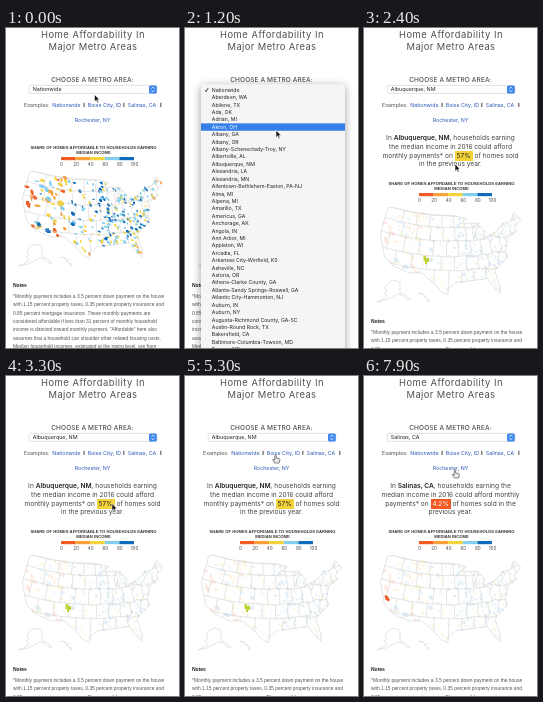
Write an HTML page that moves like this. It is 173 px wide and 320 px high and loops after 8000 ms.

```html
<!DOCTYPE html>
<html lang="en">
<head>
<meta charset="utf-8">
<title>Home affordability</title>
<style>
html, body { margin: 0; width: 100%; height: 100%; overflow: hidden; background: #fff; }
svg { position: absolute; left: 0; top: 0; width: 173px; height: 320px; overflow: hidden; font-family: Inter, "Open Sans", sans-serif; }
#para { position: absolute; left: 0; top: 106px; width: 173px; text-align: center; white-space: nowrap;
  font: 6.6px/8.75px Inter, "Open Sans", sans-serif; color: #444; }
#para b { color: #222; font-weight: 600; }
#para span { padding: 1px 1.9px; color: #222; }
.arial { font-family: "Liberation Sans", Arial, sans-serif; }
#popup { filter: drop-shadow(0 2px 4px rgba(0,0,0,.4)); }
</style>
</head>
<body>
<svg viewBox="0 0 173 320" id="page"></svg>
<div id="para"></div>
<svg viewBox="0 0 173 320" id="over"></svg>
<script>
const $ = id => document.getElementById(id);
const COLORS = ['#f15a22', '#f9a03a', '#f3d339', '#80cfee', '#0f6cba'];
let seed = 11;
const rand = () => (seed = seed * 16807 % 2147483647) / 2147483647;

const text = (x, y, size, str, extra = '') =>
  `<text x="${x}" y="${y}" font-size="${size}" ${extra}>${str}</text>`;
const rect = (x, y, w, h, fill, extra = '') =>
  `<rect x="${x}" y="${y}" width="${w}" height="${h}" fill="${fill}" ${extra}/>`;
const mid = 'text-anchor="middle"';

// ---- Map: Albers equal-area projection of longitude and latitude ----
const rad = Math.PI / 180, s1 = Math.sin(29.5 * rad), n = (s1 + Math.sin(45.5 * rad)) / 2;
const C = 1 - s1 * s1 + 2 * n * s1;
const rho = lat => Math.sqrt(C - 2 * n * Math.sin(lat * rad)) / n;
function project([lon, lat]) {
  const a = n * (lon + 96) * rad, r = rho(lat);
  return [88 + 195 * r * Math.sin(a), 191 - 195 * (rho(37.5) - r * Math.cos(a))];
}
const line = pts => 'M' + pts.map(p => project(p).map(v => v.toFixed(1))).join('L');

const shore = `-122.8 49,-114 49,-105 49,-95 49,-89.6 48,-92 46.7,-84.7 46.3,-87.7 44.5,-87.4 41.7,-86.3 44,
  -84.7 45.8,-82.6 43.9,-83.2 42,-79 42.8,-76.3 44,-74.9 45,-71.5 45,-69 47.3,-67 44.8,-70.7 43,-70 41.8,-74 40.6,
  -76 37,-75.6 35.3,-81 32,-80.1 26.8,-80.6 25.2,-82.8 27.8,-83.9 30,-89.2 29.8,-94.5 29.5,-97.3 27.5,-97.3 25.9,
  -99.2 26.5,-102.7 29.5,-106.5 31.8,-111 31.3,-117.1 32.5,-120.6 34.6,-124.3 40.4,-124.6 48.4`;
const coast = line(shore.split(',').map(p => p.trim().split(' ').map(Number))) + 'Z';

// State borders: straight and wide apart in the west, closer and more crooked towards the east
const crook = lon => Math.max(0, lon + 102) / 20 * (rand() - .5);
const bands = [25, 33, 37, 41.5, 45.5, 49];
let states = '';
bands.forEach((lat, i) => {
  if (!i) return;
  const row = [];
  for (let lon = -125; lon < -66; lon += 2.5) row.push([lon, lat + crook(lon)]);
  states += line(row);
  for (let lon = -121 + 5 * rand(); lon < -68; lon += 6.5 - .07 * (lon + 124)) {
    const low = bands[i - 1];
    states += line([0, .25, .5, .75, 1].map(u => [lon + crook(lon), low + (lat - low) * u]));
  }
});

// Metro areas: few and large in the west, many and small in the east, dearer near the west coast and the south
const metros = ['', '', '', '', ''];
function metro(x, y, w, h, c) {
  const f = v => v.toFixed(1), k = w * .3;
  metros[c] += `M${f(x - w / 2)} ${f(y - h / 2)}h${f(w - k)}v${f(h * .3)}h${f(k)}v${f(h * .7)}h${f(k - w)}v${f(-h * .3)}h${f(-k)}z`;
}
const pen = document.createElement('canvas').getContext('2d'), land = new Path2D(coast);
for (let i = 0; i < 1500; i++) {
  const x = 18 + 140 * rand(), y = 143 + 90 * rand(), size = rand(), shape = rand(), keep = rand(), mood = rand();
  const far = Math.max(0, 1 - (x - 18) / 65);
  if (!pen.isPointInPath(land, x, y) || keep > (x > 92 ? .62 : .2)) continue;
  const share = .74 - .45 * far + .45 * far * Math.cos((x - 38) / 5)
    - .35 * Math.max(0, (y - 205) / 25) - .2 * Math.max(0, (x - 135) / 20) + (mood - .5) * .55;
  metro(x, y, 1.3 + (2 + 3.5 * far) * size, 1.3 + (2 + 3.5 * far) * shape, Math.max(0, Math.min(4, Math.floor(share * 5))));
}
const alaska = 'M24 219l5-3l7 2v11l4 1l6 5l-2 1l-6-5l-5-1l-5 3l-6 3l-9 2l8-4l2-2l-3-3l3-2l-2-4z';
const hawaii = [0, 1, 2, 3].map(i => `M${55 + 2.6 * i} ${229 + i * i * .7}h1.5l${.4 * i} ${.6 + .5 * i}h-1.5z`).join('');

// ---- Page ----
const link = 'fill="#2a56b5"', bar = x => rect(x, 74.8, .9, 4.2, '#333');
const notes = ['*Monthly payment includes a 3.5 percent down payment on the house',
  'with 1.15 percent property taxes, 0.35 percent property insurance and',
  '0.85 percent mortgage insurance. These monthly payments are',
  'considered affordable if less than 31 percent of monthly household',
  'income is directed toward monthly payment. "Affordable" here also',
  'assumes that a household can shoulder other related housing costs.',
  'Median household incomes, estimated at the metro level, are from'];

$('page').innerHTML = `<g fill="#505050">
  ${text(87, 9.5, 9.4, 'Home Affordability In', mid + ' letter-spacing=".5"')}
  ${text(87, 21.7, 9.4, 'Major Metro Areas', mid + ' letter-spacing=".4"')}
  ${text(86.5, 54, 6.5, 'CHOOSE A METRO AREA:', mid + ' font-weight="500" letter-spacing=".12"')}
  ${text(18, 79, 5.3, 'Examples:')}</g>
  ${rect(23.2, 57.4, 127.6, 8, '#fff', 'rx="1.5" stroke="#c4c4c4" stroke-width=".5"')}
  ${rect(143, 57.4, 7.8, 8, '#3d87ee', 'rx="1.5"')}
  <path d="M145.5 60.6l1.4-1.5l1.4 1.5M145.5 62.2l1.4 1.5l1.4-1.5" fill="none" stroke="#fff" stroke-width=".8"/>
  ${text(26.8, 63.3, 5.4, '', 'id="choice" fill="#222"')}
  ${text(46.3, 79, 5.3, 'Nationwide', link)}${bar(77.6)}${text(81.7, 79, 5.3, 'Boise City, ID', link)}${bar(117.4)}
  ${text(121.8, 79, 5.3, 'Salinas, CA', link)}${bar(154.4)}${text(86.5, 94, 5.3, 'Rochester, NY', mid + link)}
  <g id="low">
  <g class="arial" font-weight="700" fill="#333">
  ${text(87.5, 120.8, 4.2, 'SHARE OF HOMES AFFORDABLE TO HOUSEHOLDS EARNING', mid)}
  ${text(87.5, 126.4, 4.2, 'MEDIAN INCOME', mid)}</g>
  ${COLORS.map((c, i) => rect(55 + 14.6 * i, 129, 14.6, 3.2, c) +
    text(55.5 + 14.6 * i, 138, 4.6, 20 * i, mid + ' fill="#444"')).join('')}
  ${text(128.5, 138, 4.6, 100, mid + ' fill="#444"')}
  <clipPath id="land"><path d="${coast}"/></clipPath>
  <g id="metros">${metros.map((d, i) => `<path d="${d}" fill="${COLORS[i]}"/>`).join('')}</g>
  <g fill="none" stroke="#bdbdbd" stroke-width=".4"><path d="${states}" clip-path="url(#land)"/>
  <path d="${coast}${alaska}${hawaii}"/></g>
  <path id="spot"/>
  <g class="arial" fill="#555">${text(7, 259, 5, 'Notes', 'font-weight="700" fill="#222"')}
  ${notes.map((s, i) => text(7, 269.8 + 8.35 * i, 4.9, s)).join('')}</g></g>`;

// ---- Drop-down list and pointer ----
const cities = ['Nationwide', 'Aberdeen, WA', 'Abilene, TX', 'Ada, OK', 'Adrian, MI', 'Akron, OH', 'Albany, GA', 'Albany, OR',
  'Albany-Schenectady-Troy, NY', 'Albertville, AL', 'Albuquerque, NM', 'Alexandria, LA', 'Alexandria, MN',
  'Allentown-Bethlehem-Easton, PA-NJ', 'Alma, MI', 'Alpena, MI', 'Amarillo, TX', 'Americus, GA', 'Anchorage, AK',
  'Angola, IN', 'Ann Arbor, MI', 'Appleton, WI', 'Arcadia, FL', 'Arkansas City-Winfield, KS', 'Asheville, NC',
  'Astoria, OR', 'Athens-Clarke County, GA', 'Atlanta-Sandy Springs-Roswell, GA', 'Atlantic City-Hammonton, NJ',
  'Auburn, IN', 'Auburn, NY', 'Augusta-Richmond County, GA-SC', 'Austin-Round Rock, TX', 'Bakersfield, CA',
  'Baltimore-Columbia-Towson, MD', 'Bangor, ME'];
const ROW = 7.41, TOP = 58.3;
$('over').innerHTML = `<g id="popup">${rect(16, 56.3, 144, 275, '#f5f5f5', 'rx="2"')}
  ${rect(16, 0, 144, ROW, '#347fe8', 'id="mark"')}
  <g id="rows">${cities.map((c, i) => text(26.8, TOP + 5.5 + ROW * i, 5.2, c)).join('')}</g>
  <path id="tick" d="M20 62l1.2 1.6l2-3.6" fill="none" stroke-width=".8"/></g>
  <g id="pointer" stroke="#fff" stroke-width=".6">
  <path id="arrow" d="M0 0V7.2L1.7 5.7L2.8 8.2L4 7.7L2.9 5.2H5.1Z" fill="#111"/>
  <path id="hand" d="M-.7 .5Q0-.5.7.5V3L3.8 3.7Q4.6 4 4.3 5.2L3.6 8H-.6L-2.8 4.8Q-2.5 3.9-1.6 4.4L-.7 5.2Z" fill="#eee" stroke="#333"/></g>`;

// ---- Timeline ----
const OPEN = 400, PICK = 2200, MOVE = 600;
const usual = ['households earning the', 'median income in 2016 could afford monthly', 'payments* on', 'of homes sold in the', 'previous year.'];
const views = [
  { at: 0, name: 'Nationwide' },
  { at: PICK, name: 'Albuquerque, NM', share: '57%', color: COLORS[2], spot: 'M59.5 192h2.5v2h3v4h-2v2h-2v-3h-1.5z', fill: '#bcd435',
    lines: ['households earning', 'the median income in 2016 could afford', 'monthly payments* on', 'of homes sold', 'in the previous year.'] },
  { at: 5600, name: 'Boise City, ID', share: '60.8%', color: COLORS[3], spot: 'M38.5 161h2v2h3v2.5h-2v3h-3v-3h.5z', fill: '#6ccfcb' },
  { at: 7000, name: 'Salinas, CA', share: '4.2%', color: COLORS[0], spot: 'M20.5 183.5h2.5l3 4.5l-1.5 1.5l-3-2z', fill: COLORS[0] }
];
// Arrival time and place of each pointer stop
const stops = [[0, 88.5, 66.5], [OPEN, 91, 63.5], [1500, 91, 140.5], [1950, 91, 136], [3000, 106, 127.5],
  [5200, 90.5, 79], [6100, 88, 122], [6700, 129.5, 76.5], [7750, 91, 94]];

function pointerAt(t) {
  let [, x, y] = stops[0], last = 0;
  for (const [end, px, py] of stops.slice(1)) {
    const from = Math.max(last, end - MOVE), u = Math.max(0, Math.min(1, (t - from) / (end - from)));
    const e = u * u * (3 - 2 * u);
    x += (px - x) * e;
    y += (py - y) * e;
    last = end;
  }
  return [x, y];
}
const show = (id, on) => $(id).style.display = on ? '' : 'none';

let shown;
function setView(v) {
  if (v === shown) return;
  shown = v;
  $('choice').textContent = v.name;
  $('low').setAttribute('transform', `translate(0 ${v.share ? 36 : 0})`);
  $('metros').setAttribute('opacity', v.share ? .13 : 1);
  $('spot').setAttribute('d', v.spot || '');
  $('spot').setAttribute('fill', v.fill || 'none');
  const l = v.lines || usual, ink = v.color === COLORS[0] ? '#fff' : '#222';
  $('para').innerHTML = v.share ? `In <b>${v.name}</b>, ${l[0]}<br>${l[1]}<br>${l[2]}
    <span style="background:${v.color};color:${ink}">${v.share}</span> ${l[3]}<br>${l[4]}` : '';
}

const start = performance.now();
function draw() {
  const t = (performance.now() - start) % 8000, [x, y] = pointerAt(t), open = t >= OPEN && t < PICK;
  setView(views.filter(v => v.at <= t).pop());
  show('popup', open);
  if (open) {
    const row = Math.max(0, Math.floor((y - TOP) / ROW));
    $('mark').setAttribute('y', TOP + row * ROW);
    [...$('rows').children].forEach((r, i) => r.setAttribute('fill', i === row ? '#fff' : '#222'));
    $('tick').setAttribute('stroke', row ? '#222' : '#fff');
  }
  const onLink = !open && (y > 74 && y < 81 && x > 46 && x < 152 || y > 89 && y < 96 && x > 68 && x < 105);
  show('hand', onLink);
  show('arrow', !onLink);
  $('pointer').setAttribute('transform', `translate(${x} ${y})`);
  requestAnimationFrame(draw);
}
draw();
</script>
</body>
</html>
```
